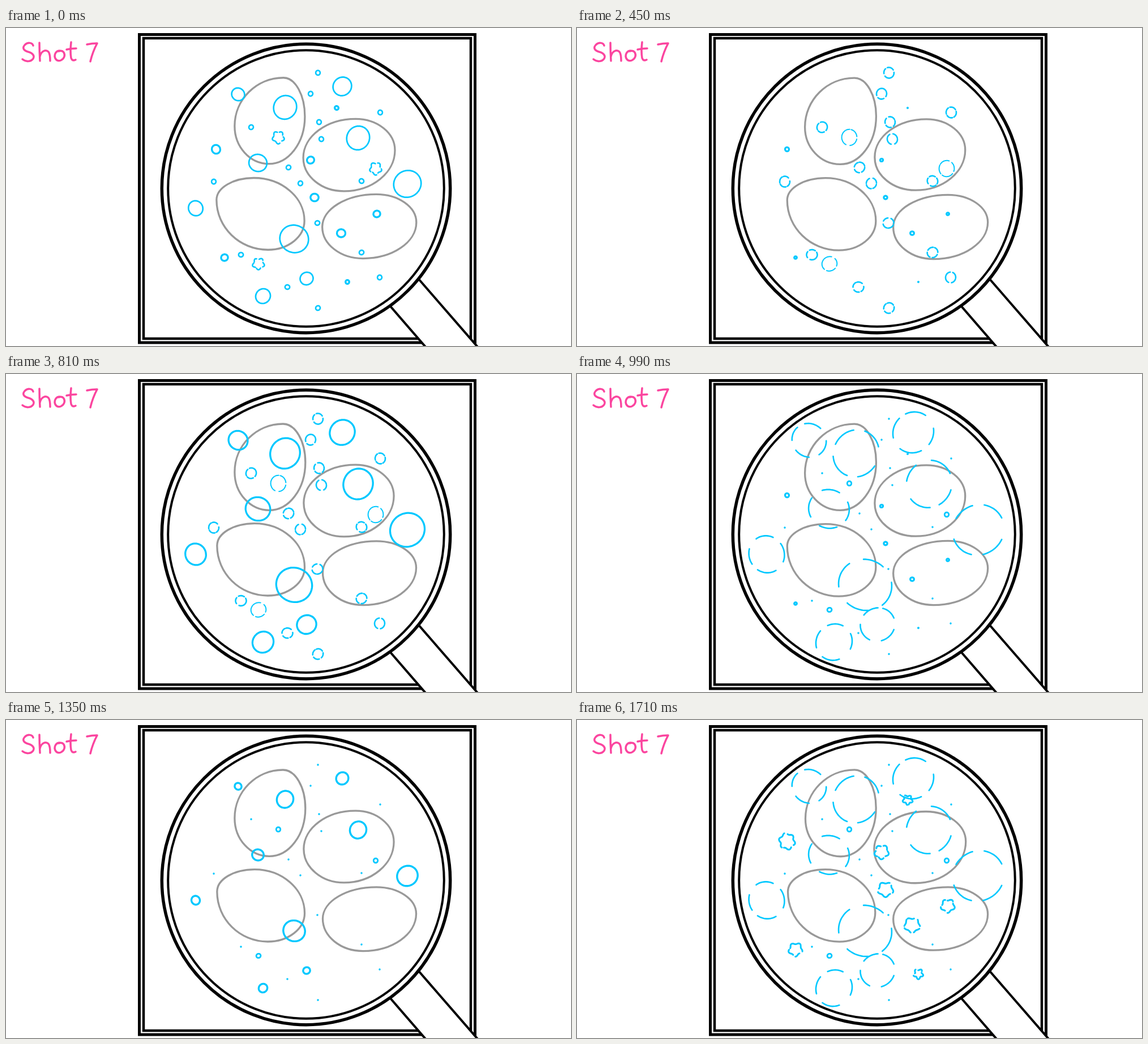
Write an HTML page that moves like this. It is 998 px wide and 561 px high and loops after 1.8 s.

```html
<!DOCTYPE html>
<html lang="en">
<head>
<meta charset="utf-8">
<title>Shot 7</title>
<style>
  html, body { margin: 0; width: 100%; height: 100%; overflow: hidden; background: #fff; }
  svg { display: block; width: 100%; height: 100%; }
  path { fill: none; stroke-linecap: round; stroke-linejoin: round; }
  .frame, .lens, .handle { fill: #fff; stroke: #000; }
  .lettering { stroke: #fb459f; stroke-width: 3.5; }
  .cells { stroke: #999; stroke-width: 3.3; }
  .bubbles { stroke: #00c8ff; }
</style>
</head>
<body>
<svg viewBox="0 0 998 561">
  <g class="frame">
    <rect x="235.5" y="11.5" width="593" height="543.5" stroke-width="5"/>
    <rect x="243" y="18" width="578" height="530" stroke-width="4.5"/>
  </g>
  <path class="handle" style="fill:#fff" stroke-width="4" d="M679 491L744 566H836L729 443"/>
  <g class="lens">
    <circle cx="530" cy="283" r="254.7" stroke-width="5.5"/>
    <circle cx="530" cy="283" r="243.8" stroke-width="4"/>
  </g>
  <g class="lettering" role="img" aria-label="Shot 7">
    <path d="M48 31C46 25 38 25 33 30C28 36 32 40 39 42C47 44 51 49 48 54C44 60 35 60 29 55"/>
    <path d="M59 26Q59 42 60 58M60 50C62 41 70 37 75 42Q78 46 78 58"/>
    <path d="M95 40C88 40 86 46 86 50C87 57 92 59 97 57C103 54 105 48 102 43Q99 39 93 41"/>
    <path d="M115 25Q113 42 115 53Q117 59 123 56M107 38Q115 36 124 36"/>
    <path d="M143 29Q152 27 161 27Q153 42 149 59"/>
  </g>
  <g id="scene"></g>
</svg>
<script>
const LOOP = 1800;
const scene = document.getElementById('scene');

function seeded(seed) {
  return () => {
    const v = Math.sin(++seed * 12.9898) * 43758.5453;
    return v - Math.floor(v);
  };
}

// A cell is given by the points where it touches the sides of its box.
const cells = [
  { left: [403, 174], top: [490, 88], right: [528, 156], bottom: [465, 240] },
  { left: [525, 228], top: [617, 161], right: [686, 215], bottom: [597, 287] },
  { left: [372, 303], top: [438, 264], right: [527, 340], bottom: [463, 392] },
  { left: [559, 351], top: [655, 294], right: [725, 342], bottom: [630, 407] }
];

function cellPath({ left, top, right, bottom }, random) {
  const [l, t, r, b] = [left, top, right, bottom].map(p => p.map(v => v + 2 * random() - 1));
  const K = 0.5523;
  const mix = (from, to) => from + (to - from) * K;
  const toSide = (p, q) => `C${mix(p[0], q[0])} ${p[1]} ${q[0]} ${mix(q[1], p[1])} ${q}`;
  const toEnd = (p, q) => `C${p[0]} ${mix(p[1], q[1])} ${mix(q[0], p[0])} ${q[1]} ${q}`;
  return `M${t}${toSide(t, r)}${toEnd(r, b)}${toSide(b, l)}${toEnd(l, t)}Z`;
}

const cellPoses = Array.from({ length: 5 }, (_, pose) => {
  const random = seeded(pose * 100);
  return `<path d="${cells.map(cell => cellPath(cell, random)).join('')}"/>`;
});

// Part of a hand-drawn ring between two fractions of a turn; bump scallops its edge.
function arc(x, y, r, from, to, bump, lean) {
  const waves = Math.max(5, Math.round(r * 0.42));
  const count = Math.max(4, Math.ceil((to - from) * 80));
  const points = Array.from({ length: count + 1 }, (_, i) => {
    const a = 2 * Math.PI * (from + (to - from) * i / count);
    const radius = r * (1 + 0.03 * Math.sin(2 * a + lean)) + bump * Math.sin(waves * a);
    return `${(x + radius * Math.cos(a)).toFixed(1)} ${(y + radius * Math.sin(a)).toFixed(1)}`;
  });
  return 'M' + points.join('L');
}

// Radius grows from start(full) to full as `size` goes from 0 to 1.
function bubblePath([x, y, full], start, { size, bump = 0, dashes = 0, cover = 0 }) {
  const r = Math.max(0.4, start(full) + (full - start(full)) * size);
  const random = seeded(x + y);
  const lean = 6 * random();
  if (!dashes) return arc(x, y, r, 0, 1, bump, lean);
  let path = '';
  for (let i = 0; i < dashes; i++) {
    const from = lean + (i + 0.2 * random()) / dashes;
    path += arc(x, y, r, from, from + cover * (0.8 + 0.3 * random()) / dashes, bump, lean);
  }
  return path;
}

// Stages follow one another from step `first`; the rest of the cycle is empty.
const bubbleKinds = [
  {
    cycle: 8, first: 6, start: full => 0.8 * full - 18,
    places: [[493, 140, 41], [594, 103, 36], [622, 194, 41], [709, 275, 45], [509, 372, 46],
      [445, 238, 35], [335, 318, 32], [454, 473, 32], [531, 442, 30], [410, 117, 30]],
    stages: [
      { size: -0.45, width: 3.4 },
      { size: 0, width: 3.4 },
      { size: 0.22, width: 2.7 },
      { size: 0.45, width: 3.3 },
      { size: 0.7, width: 3.4, bump: 2, dashes: 5, cover: 0.8 },
      { size: 1, width: 2.6, dashes: 4, cover: 0.65 }
    ]
  },
  {
    cycle: 6, first: 5, start: full => 0.5 * full - 5,
    places: [[371, 214, 17], [538, 233, 15], [545, 299, 16], [592, 362, 16.5],
      [655, 328, 14.5], [386, 405, 14.5], [603, 448, 10.5], [584, 141, 10.5]],
    stages: [
      { size: 0, width: 3.2 },
      { size: 0.3, width: 3.3 },
      { size: 0.72, width: 3, bump: 1.5, dashes: 5, cover: 0.8 },
      { size: 1, width: 2.6, dashes: 4, cover: 0.7 }
    ]
  },
  {
    cycle: 4, first: 3, start: () => 0.8,
    places: [[551, 79], [538, 116], [661, 149], [553, 166], [557, 196], [433, 175], [367, 271], [499, 246],
      [520, 274], [550, 344], [415, 400], [497, 457], [551, 494], [660, 440], [628, 396], [628, 270]]
      .map(place => [...place, 9.2]),
    stages: [
      { size: 0, width: 1.8 },
      { size: 0.38, width: 2.6 },
      { size: 1, width: 2.6, dashes: 4, cover: 0.8 }
    ]
  },
  {
    cycle: 4, first: 3, start: () => 3.8,
    places: [[481, 193, 13.8], [653, 248, 13.8], [446, 416, 13]],
    stages: [
      { size: 0, width: 2.8 },
      { size: 0.6, width: 2.6, bump: 1.4, dashes: 5, cover: 0.75 },
      { size: 1, width: 2, dashes: 4, cover: 0.85 }
    ]
  }
];

function bubbleDrawings({ cycle, first, start, places, stages }) {
  return Array.from({ length: cycle }, (_, step) => {
    const stage = stages[(step - first + cycle) % cycle];
    if (!stage) return '';
    const d = places.map(place => bubblePath(place, start, stage)).join('');
    return `<path stroke-width="${stage.width}" d="${d}"/>`;
  });
}

// Each layer flips through its drawings at its own pace.
function makeLayer(name, hold, drawings) {
  const groups = drawings.map(markup => {
    const group = document.createElementNS(scene.namespaceURI, 'g');
    group.setAttribute('class', name);
    group.innerHTML = markup;
    scene.append(group);
    return group;
  });
  return { hold, groups };
}

const layers = [
  makeLayer('cells', 120, cellPoses),
  ...bubbleKinds.map(kind => makeLayer('bubbles', 90, bubbleDrawings(kind)))
];

function render() {
  const time = performance.now() % LOOP;
  for (const { hold, groups } of layers) {
    const current = Math.floor(time / hold) % groups.length;
    groups.forEach((group, i) => { group.style.display = i === current ? '' : 'none'; });
  }
  requestAnimationFrame(render);
}
render();
</script>
</body>
</html>
```
